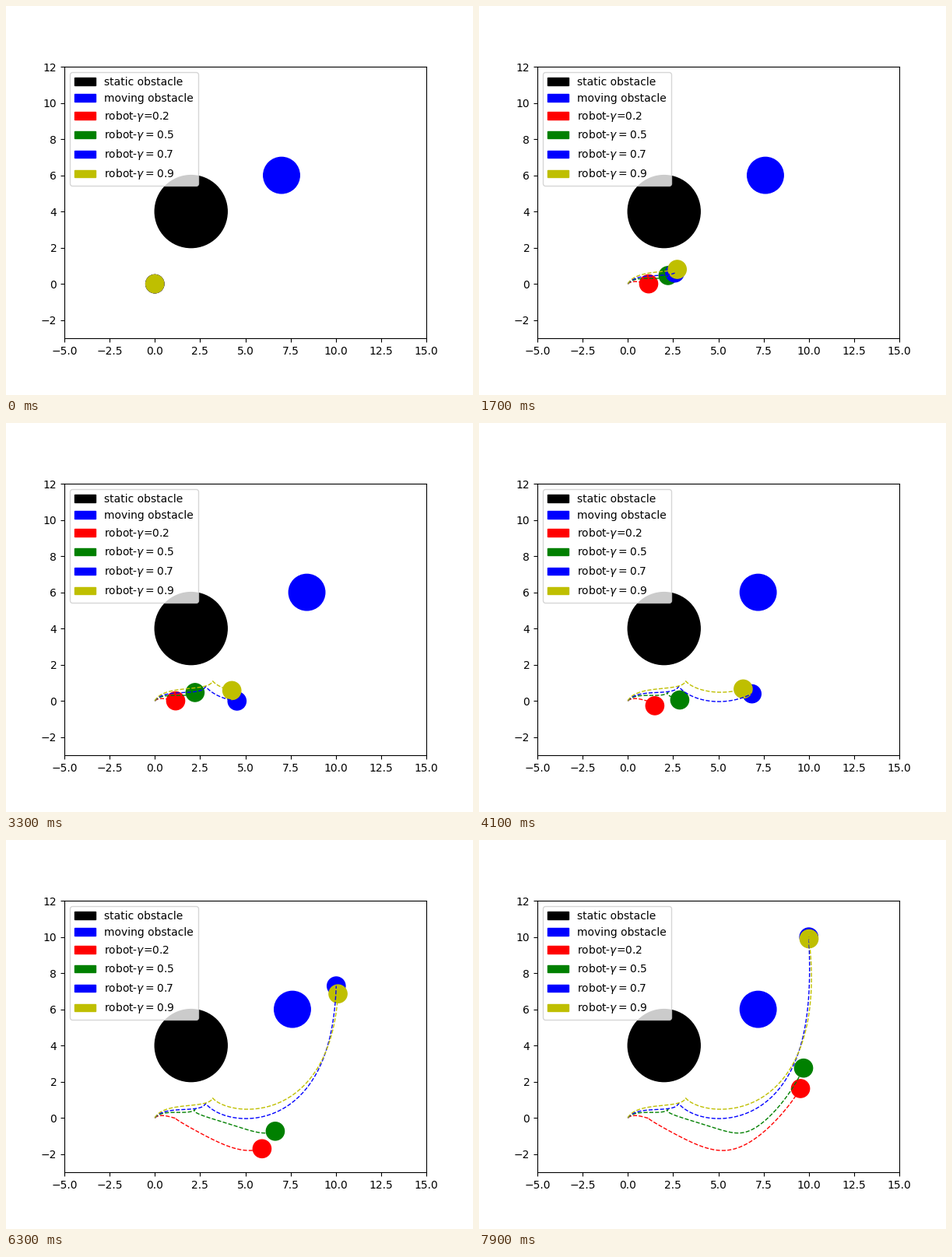
These frames come from a looping animation (600x500 px, 8000 ms). A matplotlib script:

```python
from math import comb

import numpy as np
import matplotlib.pyplot as plt
from matplotlib.animation import FuncAnimation
from matplotlib.patches import Circle

FRAMES = 80
INTERVAL = 100
START, GOAL = (0, 0), (10, 10)


def bezier(points, u):
    n = len(points) - 1
    u = np.clip(u, 0, 1)
    weights = [comb(n, k) * u ** k * (1 - u) ** (n - k) for k in range(n + 1)]
    return np.dot(weights, points)


def settle(u):
    """Pick up speed quickly, then slow down towards the end."""
    return 1 - (1 - np.clip(u, 0, 1) ** 1.5) ** 2.1


def steady(u):
    return u


class Robot:
    """Drives to a waiting point, rests there, then drives on."""

    def __init__(self, color, label, approach, arrive, onward, go, end, pace):
        self.approach = [START, *approach]
        self.onward = [approach[-1], *onward]
        self.arrive, self.go, self.end, self.pace = arrive, go, end, pace
        self.path = np.array([self.position(t) for t in range(FRAMES)])
        self.disc = add_disc(START, 0.5, color, label)
        self.trail, = ax.plot([], [], "--", color=color, lw=1)

    def position(self, t):
        if t < self.go:
            return bezier(self.approach, t / self.arrive)
        u = (t - self.go) / (self.end - self.go)
        return bezier(self.onward, self.pace(u))

    def show(self, n):
        self.disc.center = self.path[n]
        self.trail.set_data(*self.path[:n + 1].T)


def add_disc(xy, radius, color, label):
    return ax.add_patch(Circle(xy, radius, color=color, label=label))


fig, ax = plt.subplots(figsize=(6, 5), dpi=100)
ax.set_aspect("equal")
ax.set_xlim(-5, 15)
ax.set_ylim(-3, 12)

add_disc((2, 4), 2, "k", "static obstacle")
mover = add_disc((7, 6), 1, "b", "moving obstacle")

robots = [
    Robot("r", r"robot-$\gamma$=0.2",
          [(.35, .33), (1.18, -.1), (1.15, 0)], 16,
          [(.83, -.09), (5.49, -2.16), (4.68, -2.9), (7.65, -1.48), (9.54, 1.62)],
          36, 79, steady),
    Robot("g", r"robot-$\gamma=0.5$",
          [(.4, .55), (1.9, .1), (2.22, .46)], 17,
          [(1.65, -.04), (7.64, -.57), (4.8, -1.78), (7.91, -1.1), (9.71, 2.75)],
          34, 79, steady),
    Robot("b", r"robot-$\gamma=0.7$",
          [(.5, .75), (2.6, .2), (2.8, .8)], 20,
          [(4.2, -.9), (10.05, -.85), (10.2, 5), GOAL],
          21, 79, settle),
    Robot("y", r"robot-$\gamma=0.9$",
          [(.5, .95), (2.93, .45), (3.2, 1.09)], 22,
          [(4.21, -.1), (10.69, -.75), (10.4, 6.67), GOAL],
          23, 83, settle),
]

ax.legend(handles=list(ax.patches), loc="upper left")


def update(n):
    # The obstacle shuttles between x = 7 and x = 9.
    mover.center = (9 - 0.2 * abs(n % 20 - 10), 6)
    for robot in robots:
        robot.show(n)
    return [mover, *(r.disc for r in robots), *(r.trail for r in robots)]


anim = FuncAnimation(fig, update, frames=FRAMES, interval=INTERVAL,
                     init_func=lambda: update(0), repeat=True, repeat_delay=0)
plt.show()
```
